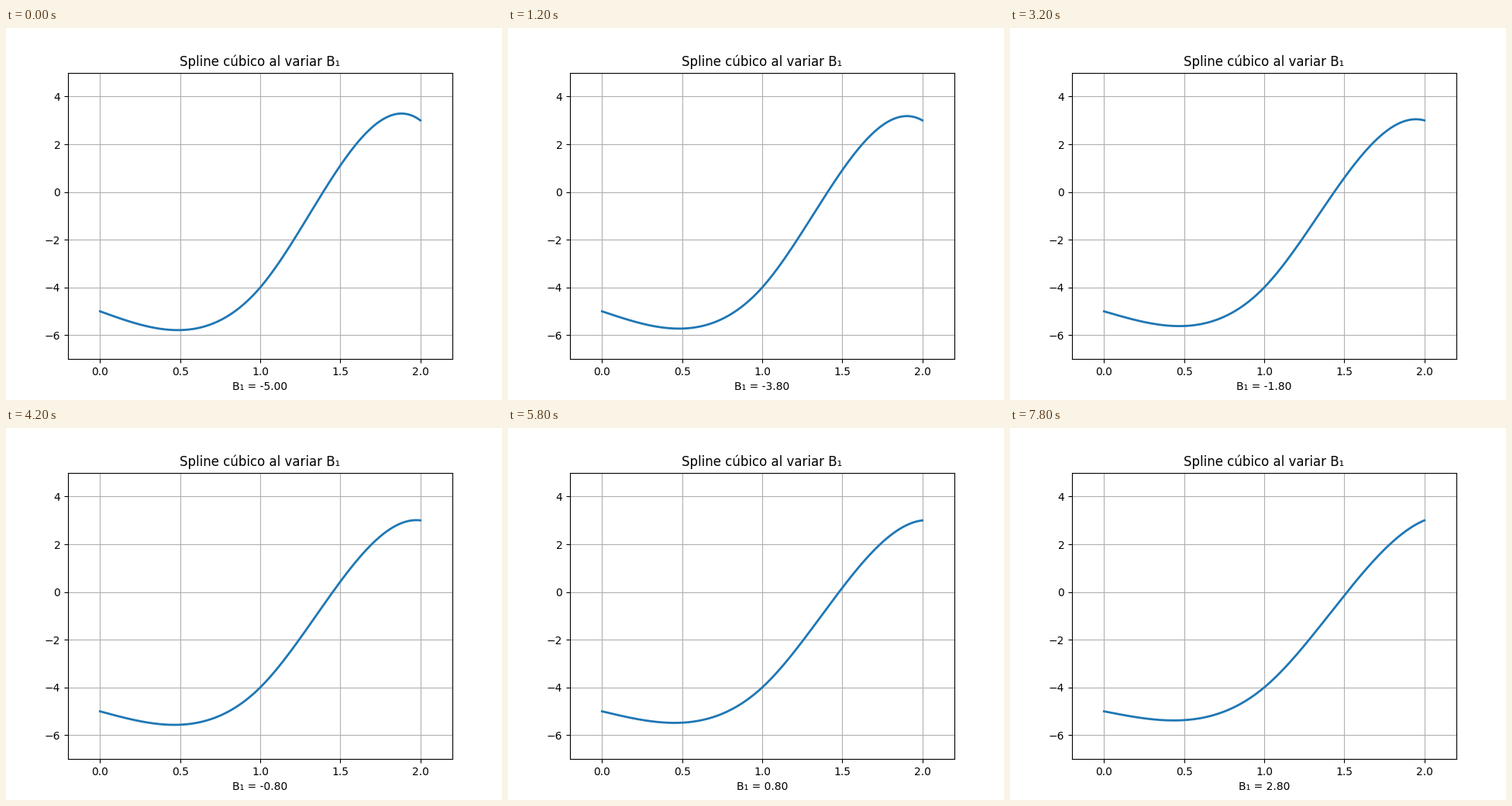
A matplotlib script that plays this animation: 640x480 px, repeating every 8000 ms.

```python
import numpy as np
import matplotlib.pyplot as plt
from matplotlib.animation import FuncAnimation

FRAMES = 40
INTERVAL = 200
START, STEP = -5.0, 0.2
Y0, Y1, Y2 = -5.0, -4.0, 3.0  # values at the knots x = 0, 1, 2

t = np.linspace(0, 1, 100)
x = np.concatenate([t, 1 + t[1:]])


def hermite(a, b, slope_a, slope_b):
    """Cubic over a unit interval from end values and end slopes."""
    h = b - a
    return (a + slope_a * t + (3 * h - 2 * slope_a - slope_b) * t**2
            + (slope_a + slope_b - 2 * h) * t**3)


def spline(b1):
    """Cubic spline, natural at x = 0 and with slope b1 at x = 2."""
    mid = (3 * (Y2 - Y0) - 1.5 * (Y1 - Y0) - b1) / 3.5
    first = (3 * (Y1 - Y0) - mid) / 2
    left = hermite(Y0, Y1, first, mid)
    right = hermite(Y1, Y2, mid, b1)
    return np.concatenate([left, right[1:]])


fig, ax = plt.subplots(figsize=(6.4, 4.8), dpi=100)
line, = ax.plot([], [], lw=2)
ax.set_xlim(-0.2, 2.2)
ax.set_ylim(-7, 5)
ax.set_title("Spline cúbico al variar B₁")
ax.grid(True)


def update(i):
    b1 = round(START + STEP * i, 2)
    line.set_data(x, spline(b1))
    ax.set_xlabel(f"B₁ = {b1:.2f}")
    return line,


anim = FuncAnimation(fig, update, frames=FRAMES, interval=INTERVAL,
                     init_func=lambda: update(0), repeat=True, blit=False)
plt.show()
```
